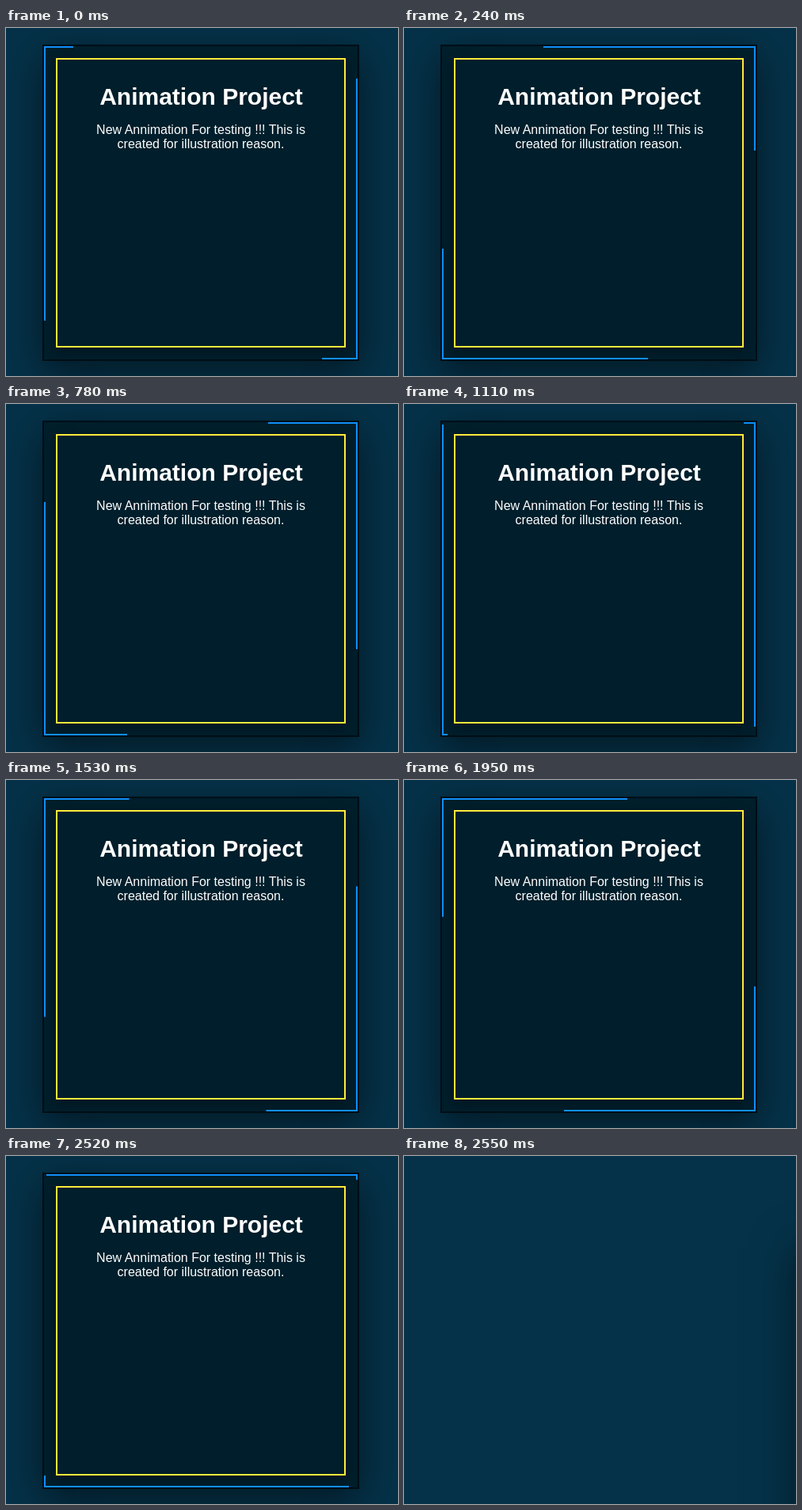
Recreate the animation shown at these times as an HTML page. Size 495x440 px, loop 6.45 s.

```html
<!DOCTYPE html>
<html lang="en">
<head>
<meta charset="utf-8">
<title>Animated border card</title>
<style>
  html, body { margin: 0; width: 100%; height: 100%; overflow: hidden; background: #053249; }
  .stage { position: relative; width: 495px; height: 440px; overflow: hidden; }
  .card {
    position: absolute; left: 46px; top: 21px; width: 396px; height: 396px;
    border: 2px solid #000e16; background: #001e2b;
    box-shadow: 0 15px 50px rgba(0, 0, 0, .5);
  }
  .panel {
    position: absolute; left: 15px; top: 15px; width: 362px; height: 362px;
    border: 2px solid #ffeb3b; background: #001e2b;
    box-shadow: 0 5px 15px rgba(0, 0, 0, .3);
  }
  svg { position: absolute; left: 0; top: 0; overflow: hidden; }
  text { fill: #fff; text-anchor: middle; font: 16px "Liberation Sans", Arial, sans-serif; }
  .title { font-size: 30px; font-weight: bold; }
  /* The outer half of the stroke is clipped, leaving a 2px line. */
  .runner { fill: none; stroke: #0f8ffa; stroke-width: 4; stroke-dasharray: 400; }
</style>
</head>
<body>
<div class="stage">
  <div class="card" id="card">
    <div class="panel"></div>
    <svg width="396" height="396">
      <rect class="runner" id="runner" width="396" height="396"/>
      <text class="title" x="198.5" y="74">Animation Project</text>
      <text x="198" y="111">New Annimation For testing !!! This is</text>
      <text x="198" y="129">created for illustration reason.</text>
    </svg>
  </div>
</div>
<script>
  const LOOP = 6450, STEP = 30, EXIT = 2550;
  const START = -363;
  // [time in ms, distance of a dash start along the border]
  const path = [[30, 66], [240, 128], [780, 283], [1110, 381], [1950, 634], [2520, 803]];

  const card = document.getElementById('card');
  const runner = document.getElementById('runner');

  function dashStart(t) {
    if (t < path[0][0]) return START;
    const next = path.findIndex(([time]) => time >= t);
    if (next <= 0) return path[next ? path.length - 1 : 0][1];
    const [t0, d0] = path[next - 1], [t1, d1] = path[next];
    return d0 + (d1 - d0) * (t - t0) / (t1 - t0);
  }

  function draw(now) {
    const t = Math.floor(now % LOOP / STEP) * STEP;
    card.style.transform = t >= EXIT ? 'translate(450px, 80px)' : 'none';
    runner.style.strokeDashoffset = -dashStart(t);
    requestAnimationFrame(draw);
  }

  draw(0);
</script>
</body>
</html>
```
